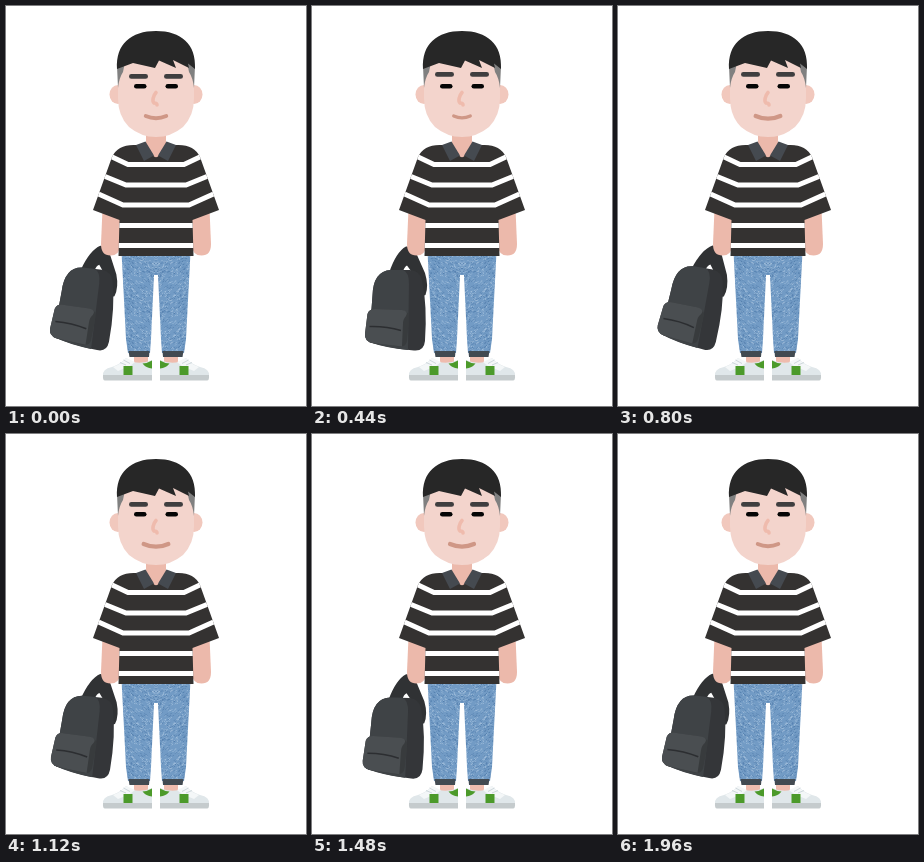
An HTML page for the animation above (2000 ms loop, 300 px wide and 400 px high).

```html
<!DOCTYPE html>
<html lang="en">
<head>
<meta charset="utf-8">
<title>Man with a swinging backpack</title>
<style>
html, body { margin: 0; width: 100%; height: 100%; overflow: hidden; background: #fff; }
svg { display: block; width: 300px; height: 400px; }
</style>
</head>
<body>
<svg viewBox="0 0 300 400">
  <defs>
    <pattern id="denim" width="40" height="40" patternUnits="userSpaceOnUse">
      <rect width="40" height="40" fill="#729bc5"/>
      <path id="light" stroke="#a6c1dd" stroke-width=".8"/>
      <path id="dark" stroke="#4f7bab" stroke-width=".8"/>
    </pattern>
    <clipPath id="shirtShape">
      <path id="shirt" d="M130 139Q112 138 106 151L87 204L113.500 214L112.500 250H187.500L186.500 214L213 204L194 151Q188 138 170 139Z"/>
    </clipPath>
    <g id="leg">
      <path d="M128 348H142V358H128Z" fill="#efbcae"/>
      <path d="M97 370Q96 363 106 361Q115 358 120 352L127 356Q137 358 146 354V370Z" fill="#e0e7ea"/>
      <path d="M107 361Q116 358 120 352L129 356L124 360L112 365Z" fill="#f4f7f8"/>
      <path d="M114 356.500L120 359M117.500 354L124 357.500" stroke="#cfd8dc"/>
      <path d="M136.500 357.500Q142 357 146 354.500V362.500Q140 362 136.500 357.500Z" fill="#4c9a2a"/>
      <path d="M117.500 360H126.500V369H117.500Z" fill="#4c9a2a"/>
      <path d="M97 369H146V374.500H99Q96.500 374.500 97 369Z" fill="#c5cbcd"/>
      <path d="M115.500 246H150V269H148L145 333L144 347H122L120 333Z" fill="url(#denim)"/>
      <path d="M122.500 345H143.500L143 351H123.500Z" fill="#424a51"/>
    </g>
    <path id="arm" d="M96.500 203L95 238Q95 249.500 104.500 249.500Q113.500 249.500 114 240V205Z" fill="#ecb9ab"/>
    <path id="collar" d="M130 139L139.500 135.500L148 149.500L138 155Z" fill="#454a50"/>
    <ellipse id="ear" cx="112" cy="88.500" rx="8.500" ry="9.500" fill="#f1c8bd"/>
    <rect id="brow" x="123" y="68" width="19" height="4.800" rx="2.400" fill="#3f3e3f"/>
    <g id="eye">
      <rect x="128" y="78" width="12.500" height="4.600" rx="2.300" fill="#050505"/>
      <path d="M111 60L119 56L117 66Q113 72 112 82Z" fill="#808080"/>
    </g>
  </defs>

  <g id="legs"></g>

  <g id="bag">
    <path d="M77 267Q84 246 94 240.500Q101 240 105 249L113 267Q117 280 113.500 289L104 292L99 265L95 259.500Q92 261 91 266Z" fill="#303234"/>
    <path d="M79 264H98Q108 265 110 274Q115.500 300 113 335Q112 345.500 102 344.500Q78 342.500 57 336L60.500 290Q61 265 79 264Z" fill="#343639"/>
    <path d="M79 264H91Q97 266 97 278L96 344Q74 342 57 336L60.500 290Q61 265 79 264Z" fill="#3f4346"/>
    <path d="M55.500 308Q57 303 63 303L90 304Q98 306 97 312L95 335Q94 341 88 340.500L60 337Q52.500 335 53 328Z" fill="#383b3d"/>
    <path d="M55.500 308Q57 303 63 303L90 304Q97 305 94 310Q91 313 91 318L90 340.500L60 337Q52.500 335 53 328Z" fill="#4a4e51"/>
    <path d="M57.500 320.500Q74 320 89 324.500" fill="none" stroke="#2c2e31" stroke-width="1.600"/>
  </g>

  <g id="arms"></g>
  <use href="#shirt" fill="#343231"/>
  <g id="stripes" clip-path="url(#shirtShape)" fill="none" stroke="#fff" stroke-width="5"></g>
  <path d="M140 122H160V138L152 150.500Q150 152 148 150.500L140 138Z" fill="#ecb9ab"/>
  <g id="collars"></g>

  <g id="ears"></g>
  <path d="M112 50H188V92Q188 110 177 121Q165 131 150 131Q135 131 123 121Q112 110 112 92Z" fill="#f3d4cc"/>
  <g id="eyes"></g>
  <g id="brows"></g>
  <path d="M111 63C109.500 38 125 25 150 25C175 25 190.500 38 189 63L182 57.500L183 62L167 54L170 62L153 54.500L149 62L127 57Z" fill="#272727"/>
  <path d="M150 86.500C147 90 146 95 148 97Q151 97 151 99" fill="none" stroke="#efbbad" stroke-width="3.600" stroke-linecap="round"/>
  <path id="mouth" fill="none" stroke="#cf9786" stroke-linecap="round"/>
</svg>
<script>
const $ = id => document.getElementById(id);

// Left-hand parts are mirrored about the centre line.
for (const part of ['leg', 'arm', 'collar', 'ear', 'eye', 'brow']) {
  const use = `<use href="#${part}"`;
  $(part + 's').innerHTML = `${use}/>${use} transform="matrix(-1 0 0 1 300 0)"/>`;
}

// Each stripe: outer x, outer y, bend x, body y.
$('stripes').innerHTML = [
  [103, 149.5, 122, 158.5], [93, 168, 120, 179], [87, 185.5, 117, 199],
  [112, 219.5, 113, 219.5], [112, 239.5, 113, 239.5]
].map(([x, y, bend, body]) =>
  `<path d="M${x} ${y}L${bend} ${body}H${300 - bend}L${300 - x} ${y}"/>`).join('');

let seed = 7;
const random = () => (seed = seed * 16807 % 2147483647) / 2147483647;
const flecks = n => Array.from({ length: n }, () =>
  `M${(random() * 40).toFixed(1)} ${(random() * 40).toFixed(1)}l1.2 1.2`).join('');
$('light').setAttribute('d', flecks(260));
$('dark').setAttribute('d', flecks(200));

// Pairs of time and value, joined by sine easing.
const swing = [[0, 6.2], [430, 0], [895, 10.4], [1345, 0.8], [1900, 6.2], [2000, 6.2]];
const smile = [[0, 10.3], [440, 8.3], [800, 12.3], [1300, 12.3], [2000, 10.3]];
const lift = [[0, 0], [440, -2], [800, -2], [1120, 0], [2000, 0]];

function sample(keys, t) {
  const i = keys.findIndex(key => key[0] > t);
  const [t0, a] = keys[i - 1], [t1, b] = keys[i];
  return a + (b - a) * (1 - Math.cos(Math.PI * (t - t0) / (t1 - t0))) / 2;
}

const start = performance.now();
function draw() {
  const t = Math.max(0, performance.now() - start) % 2000;
  $('bag').setAttribute('transform', `rotate(${sample(swing, t)} 100 243)`);
  $('brows').setAttribute('transform', `translate(0 ${sample(lift, t)})`);
  const w = sample(smile, t);
  $('mouth').setAttribute('d', `M${150 - w} 110Q150 ${110 + w * 0.44} ${150 + w} 110`);
  $('mouth').setAttribute('stroke-width', 1.2 + w * 0.25);
  requestAnimationFrame(draw);
}
draw();
</script>
</body>
</html>
```
